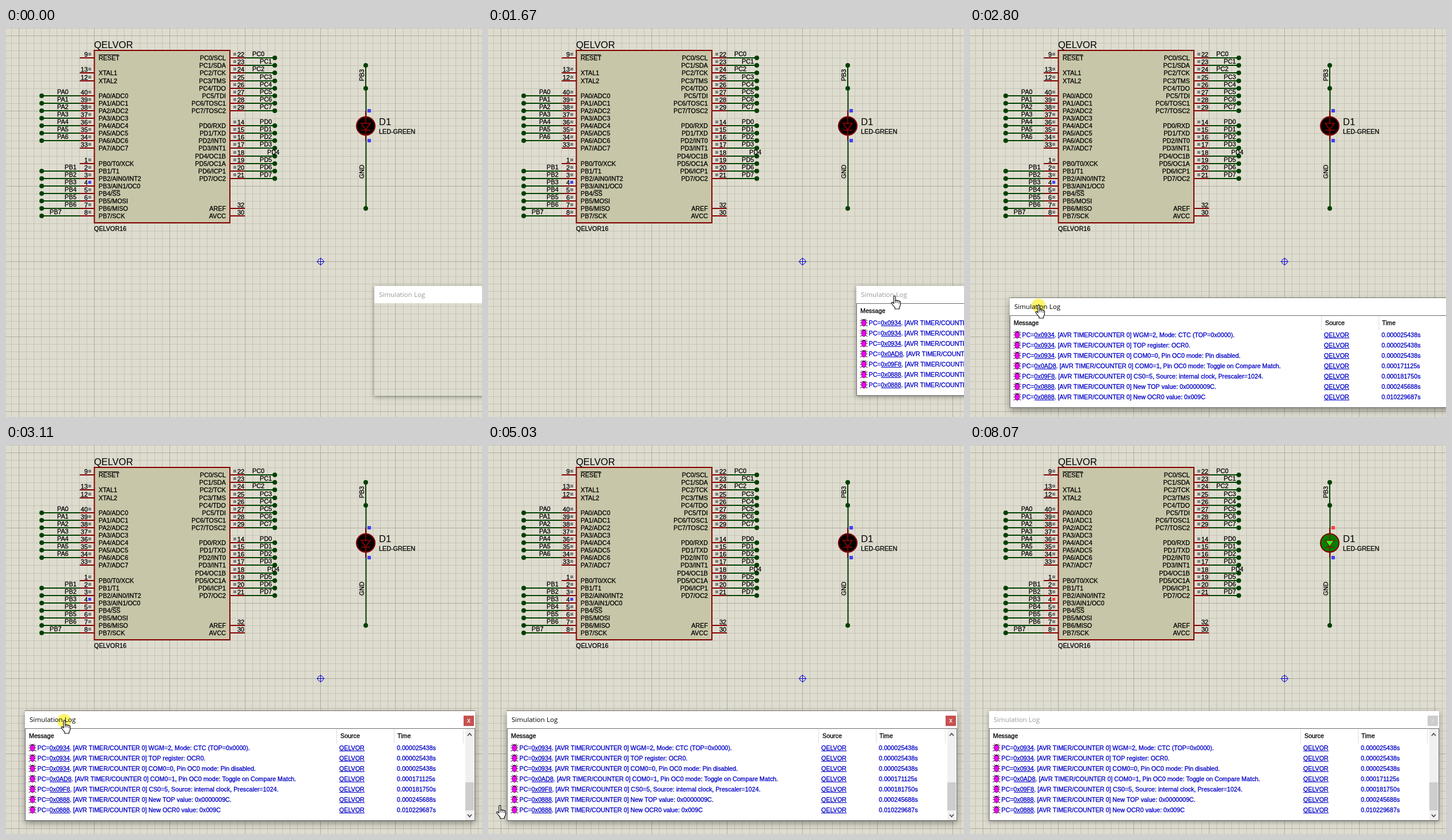
An HTML page with a canvas for the animation above (8170 ms loop, 827 by 677 pixels).

```html
<!DOCTYPE html>
<html lang="en">
<head>
<meta charset="utf-8">
<title>Simulation Log</title>
<style>
html, body { margin: 0; width: 100%; height: 100%; overflow: hidden; background: #dedccf; }
canvas { display: block; }
</style>
</head>
<body>
<canvas id="stage" width="827" height="677"></canvas>
<script>
const ctx = document.getElementById('stage').getContext('2d');
const W = 827, H = 677, LOOP = 8170;
const SANS = '"Liberation Sans", Arial, sans-serif';
const TITLE = '"Open Sans", "Noto Sans", sans-serif';
const GRID = { x: 545.6, y: 405.7, pitch: 13.085 };
const RED = '#840000', GREEN = '#004000', INK = '#000', LINK = '#0000c8';
const LOW = '#4040ff', HIGH = '#ff4040', IDLE = '#808080';
const CHIP = 'QELVOR';

const HOLDS = [[1600, 70], [1670, 70], [2430, 100], [2800, 30], [4960, 70],
  [6300, 70], [6660, 100], [7540, 50], [8070, 100]];

// [time, x, y]
const WINDOW_PATH = [[1740, 640, 449], [2330, 152, 501], [2430, 147, 498],
  [2800, 69, 470], [3080, 33, 463]];
const CURSOR_PATH = [[300, 9, 600], [820, 300, 464], [1500, 706, 465], [1740, 706, 465],
  [2330, 214, 516], [2430, 205, 512], [2800, 119, 481], [3080, 101, 478], [3880, 101, 478],
  [4180, 5, 560], [4900, 18, 621], [5800, 30, 646], [5900, 30, 646], [6640, 733, 648],
  [6900, 771, 656], [7250, 771, 690]];

const LOG = [
  ['0x0934', 'WGM=2, Mode: CTC (TOP=0x0000).', '0.000025438s'],
  ['0x0934', 'TOP register: OCR0.', '0.000025438s'],
  ['0x0934', 'COM0=0, Pin OC0 mode: Pin disabled.', '0.000025438s'],
  ['0x0AD8', 'COM0=1, Pin OC0 mode: Toggle on Compare Match.', '0.000171125s'],
  ['0x09F8', 'CS0=5, Source: internal clock, Prescaler=1024.', '0.000181750s'],
  ['0x0888', 'New TOP value: 0x0000009C.', '0.000245688s'],
  ['0x0888', 'New OCR0 value: 0x009C', '0.010229687s']
];

const LEFT = ('RESET,,XTAL1,XTAL2,,PA0/ADC0,PA1/ADC1,PA2/ADC2,PA3/ADC3,PA4/ADC4,PA5/ADC5,PA6/ADC6,' +
  'PA7/ADC7,,PB0/T0/XCK,PB1/T1,PB2/AIN0/INT2,PB3/AIN1/OC0,PB4/SS,PB5/MOSI,PB6/MISO,PB7/SCK').split(',');
const LEFT_NUM = '9,,13,12,,40,39,38,37,36,35,34,33,,1,2,3,4,5,6,7,8'.split(',');
const RIGHT = ('PC0/SCL,PC1/SDA,PC2/TCK,PC3/TMS,PC4/TDO,PC5/TDI,PC6/TOSC1,PC7/TOSC2,,PD0/RXD,PD1/TXD,' +
  'PD2/INT0,PD3/INT1,PD4/OC1B,PD5/OC1A,PD6/ICP1,PD7/OC2,,,,AREF,AVCC').split(',');
const RIGHT_NUM = '22,23,24,25,26,27,28,29,,14,15,16,17,18,19,20,21,,,,32,30'.split(',');

const rowY = i => Math.round(52.2 + 13.1 * i);

function box(x, y, w, h, color) {
  ctx.fillStyle = color;
  ctx.fillRect(x, y, w, h);
}

function line(x1, y1, x2, y2, color, width = 1) {
  ctx.strokeStyle = color;
  ctx.lineWidth = width;
  ctx.beginPath();
  ctx.moveTo(x1, y1);
  ctx.lineTo(x2, y2);
  ctx.stroke();
}

function disc(x, y, r, color) {
  ctx.fillStyle = color;
  ctx.beginPath();
  ctx.arc(x, y, r, 0, Math.PI * 2);
  ctx.fill();
}

const dot = (x, y) => disc(x, y, 4, GREEN);

// A hairline stroke gives the firm look of hinted type; returns the end x
function text(s, x, y, size = 10.8, color = INK, align = 'left', family = SANS) {
  ctx.font = size + 'px ' + family;
  ctx.textAlign = align;
  ctx.fillStyle = ctx.strokeStyle = color;
  ctx.lineWidth = .3;
  ctx.fillText(s, x, y);
  if (family === SANS && size < 12) ctx.strokeText(s, x, y);
  return x + ctx.measureText(s).width;
}

function link(s, x, y) {
  const end = text(s, x, y, 10.7, LINK);
  box(Math.round(x), y + 1, Math.round(end - x), 1, LINK);
  return end;
}

function upright(s, x, y) {
  ctx.save();
  ctx.translate(x, y);
  ctx.rotate(-Math.PI / 2);
  text(s, 0, 0, 10.8, INK, 'center');
  ctx.restore();
}

// Monotone cubic through the keys, for column c
function track(keys, t, c) {
  const last = keys.length - 1;
  if (t <= keys[0][0]) return keys[0][c];
  if (t >= keys[last][0]) return keys[last][c];
  const slope = i => i < 0 || i >= last ? 0 : (keys[i + 1][c] - keys[i][c]) / (keys[i + 1][0] - keys[i][0]);
  const tangent = i => {
    const a = slope(i - 1), b = slope(i);
    return a * b <= 0 ? 0 : 2 * a * b / (a + b);
  };
  let i = 0;
  while (t >= keys[i + 1][0]) i++;
  const d = keys[i + 1][0] - keys[i][0], u = (t - keys[i][0]) / d, v = 1 - u;
  return keys[i][c] * (1 + 2 * u) * v * v + tangent(i) * d * u * v * v +
    keys[i + 1][c] * u * u * (3 - 2 * u) - tangent(i + 1) * d * u * u * v;
}

function drawGrid() {
  box(0, 0, W, H, '#dedccf');
  for (const major of [false, true]) {
    const color = major ? '#aeada0' : '#c5c4b6';
    for (let k = -42; k <= 22; k++) {
      if ((k % 10 === 0) !== major) continue;
      box(Math.round(GRID.x + k * GRID.pitch), 0, 1, H, color);
      box(0, Math.round(GRID.y + k * GRID.pitch), W, 1, color);
    }
  }
  const x = Math.round(GRID.x) + .5, y = Math.round(GRID.y) + .5, blue = '#0000c8';
  line(x - 7, y, x + 7, y, blue);
  line(x, y - 7, x, y + 7, blue);
  ctx.beginPath();
  ctx.arc(x, y, 5, 0, Math.PI * 2);
  ctx.stroke();
}

function drawChip(on) {
  box(153, 39, 236, 300, '#c8c6a8');
  ctx.strokeStyle = RED;
  ctx.lineWidth = 2;
  ctx.strokeRect(153.5, 39, 235.5, 300);
  text(CHIP, 153, 35, 16.5);
  text(CHIP + '16', 153, 353);

  LEFT.forEach((name, i) => {
    if (!name) return;
    const y = rowY(i), net = name.slice(0, 3);
    line(128, y, 153, y, RED, 2);
    text(name, 161, y + 4);
    text(LEFT_NUM[i], 142, y - 2, 11, INK, 'right');
    box(143, y - 9, 5, 5, net === 'PB3' ? (on ? HIGH : LOW) : IDLE);
    if (!/^P[AB]/.test(net) || net === 'PA7' || net === 'PB0') return;
    line(62, y, 128, y, GREEN, 2);
    dot(62, y);
    text(net, net === 'PB7' ? 76 : net[1] === 'A' ? 89 : 102, y - 3);
  });
  line(161, 46.5, 196, 46.5, INK);
  line(184, 282.5, 198, 282.5, INK);

  RIGHT.forEach((name, i) => {
    if (!name) return;
    const y = rowY(i), net = name.slice(0, 3);
    line(390, y, 415, y, RED, 2);
    text(name, 382, y + 4, 10.8, INK, 'right');
    text(RIGHT_NUM[i], 402, y - 2, 11);
    if (name[0] === 'A') return;
    box(395, y - 9, 5, 5, IDLE);
    line(415, y, 467, y, GREEN, 2);
    dot(467, y);
    text(net, net === 'PC0' || net === 'PC2' ? 428 : net === 'PD4' ? 454 : 441, y - 3);
  });
}

function drawLed(on) {
  const x = 625;
  line(x, 65, x, 105, GREEN, 2);
  line(x + .5, 105, x + .5, 314, GREEN, 2);
  line(x, 144, x, 196, RED, 2);
  [65, 105, 314].forEach(y => dot(x, y));
  upright('PB3', 622, 82);
  upright('GND', 622, 250);
  disc(x, 170.5, 16, on ? '#008000' : '#000');
  ctx.strokeStyle = RED;
  ctx.lineWidth = 2;
  ctx.stroke();
  const ink = on ? '#7a1800' : '#a00000';
  line(x, 155, x, 186, ink, 1.5);
  ctx.beginPath();
  ctx.moveTo(617, 166);
  ctx.lineTo(633, 166);
  ctx.lineTo(x, 177);
  ctx.closePath();
  ctx.fillStyle = on ? '#30f020' : '#000';
  ctx.fill();
  ctx.stroke();
  line(617, 178, 633, 178, ink, 1.5);
  box(628, 141, 6, 6, on ? HIGH : LOW);
  box(628, 193, 6, 6, LOW);
  text('D1', 648, 169, 16.5);
  text('LED-GREEN', 648, 184);
}

function drawBug(x, y) {
  for (const s of [-1, 1]) {
    line(x + s * 2, y - 4, x + s * 4, y - 7, '#301030');
    for (const d of [-3, 0, 4]) line(x + s * 2, y + d, x + s * 6.5, y + d * 1.4, '#301030');
  }
  ctx.fillStyle = '#f000f0';
  ctx.strokeStyle = '#701070';
  ctx.beginPath();
  ctx.ellipse(x, y, 3.8, 6, 0, 0, Math.PI * 2);
  ctx.fill();
  ctx.stroke();
  box(x - 2, y - 6, 4, 2, '#501050');
}

function chevron(x, y, dir) {
  ctx.strokeStyle = '#404040';
  ctx.lineWidth = 1.5;
  ctx.beginPath();
  ctx.moveTo(x - 3.5, y + 2 * dir);
  ctx.lineTo(x, y - 2 * dir);
  ctx.lineTo(x + 3.5, y + 2 * dir);
  ctx.stroke();
}

function drawShadow(w, h, active) {
  ctx.save();
  ctx.beginPath();
  ctx.rect(-60, -60, w + 120, h + 120);
  ctx.rect(0, 0, w, h);
  ctx.clip('evenodd');
  ctx.shadowColor = active ? 'rgba(0,0,0,.4)' : 'rgba(0,0,0,.35)';
  ctx.shadowBlur = active ? 11 : 8;
  ctx.shadowOffsetY = active ? 4 : 2;
  box(0, 0, w, h, '#888');
  ctx.restore();
}

function drawLog(x, y, active, filled) {
  const w = 782, h = 191;
  ctx.save();
  ctx.translate(x, y);
  drawShadow(w, h, active);
  if (active) line(-.5, -.5, w, -.5, '#77766f');
  box(0, 0, w, 30, '#fff');
  text('Simulation Log', 8, 19, 11.6, active ? '#000' : '#999', 'left', TITLE);
  box(762, 8, 18, 18, active ? '#c75050' : '#ccc');
  text('x', 771, 20, 11, active ? '#fff' : '#ddd', 'center');
  if (filled) {
    box(0, 30, w, h - 30, '#fff');
    ctx.strokeStyle = '#6c6c6c';
    ctx.lineWidth = 1;
    ctx.strokeRect(.5, 30.5, w - 1, h - 31);
    text('Message', 7, 47, 10.7);
    text('Source', 548, 47, 10.7);
    text('Time', 647, 47, 10.7);
    [541, 641, 761].forEach(c => box(c, 32, 1, 24, '#dedede'));
    LOG.forEach(([addr, msg, time], i) => {
      const base = 68 + 18 * i;
      drawBug(13, base - 4);
      let end = text('PC=', 21.5, base, 10.7, LINK);
      end = link(addr, end, base);
      text('. [AVR TIMER/COUNTER 0] ' + msg, end, base, 10.7, LINK);
      link(CHIP, 546, base);
      text(time, 646, base, 10.7, LINK);
    });
    box(765, 31, 15, 159, '#f0f0f0');
    box(765, 124, 15, 49, '#cdcdcd');
    chevron(772.5, 41, 1);
    chevron(772.5, 182, -1);
  }
  ctx.restore();
}

const HAND = new Path2D('M4 1.5Q5.5-.5 7 1.5V9Q9 7.5 10 9.3Q12 8 13 10Q15 9.3 15.5 11.5V16' +
  'Q15.5 19 13.5 21V23.5H6V21Q3 18 0 13.5Q-.3 11.5 2 12L4 14Z');

function drawCursor(x, y, pressed) {
  if (pressed) {
    ctx.save();
    ctx.globalCompositeOperation = 'multiply';
    disc(x, y + 2, 12, '#fcf468');
    ctx.restore();
  }
  ctx.save();
  ctx.translate(x - 5, y + .5);
  ctx.fillStyle = '#fff';
  ctx.fill(HAND);
  ctx.strokeStyle = '#111';
  ctx.lineWidth = 1.2;
  ctx.lineJoin = 'round';
  ctx.stroke(HAND);
  line(7, 9, 7, 13, '#111');
  line(10, 10, 10, 13, '#111');
  line(13, 11, 13, 14, '#111');
  ctx.restore();
}

function draw(ms) {
  let t = ms % LOOP;
  const hold = HOLDS.find(([start, len]) => t >= start && t < start + len);
  if (hold) t = hold[0];
  const on = Math.floor(t / 55.79 + .38) % 2 === 1;

  drawGrid();
  drawChip(on);
  drawLed(on);
  drawLog(Math.round(track(WINDOW_PATH, t, 1)), Math.round(track(WINDOW_PATH, t, 2)),
    t >= 1740 && t < 7700, t >= 20);
  const away = t < 300 || t > 7250 || (t > 6270 && t < 6390);
  if (!away) {
    drawCursor(Math.round(track(CURSOR_PATH, t, 1)), Math.round(track(CURSOR_PATH, t, 2)),
      t >= 1740 && t < 3300);
  }
}

const begin = performance.now();
function tick() {
  draw(performance.now() - begin);
  requestAnimationFrame(tick);
}
tick();
</script>
</body>
</html>
```
